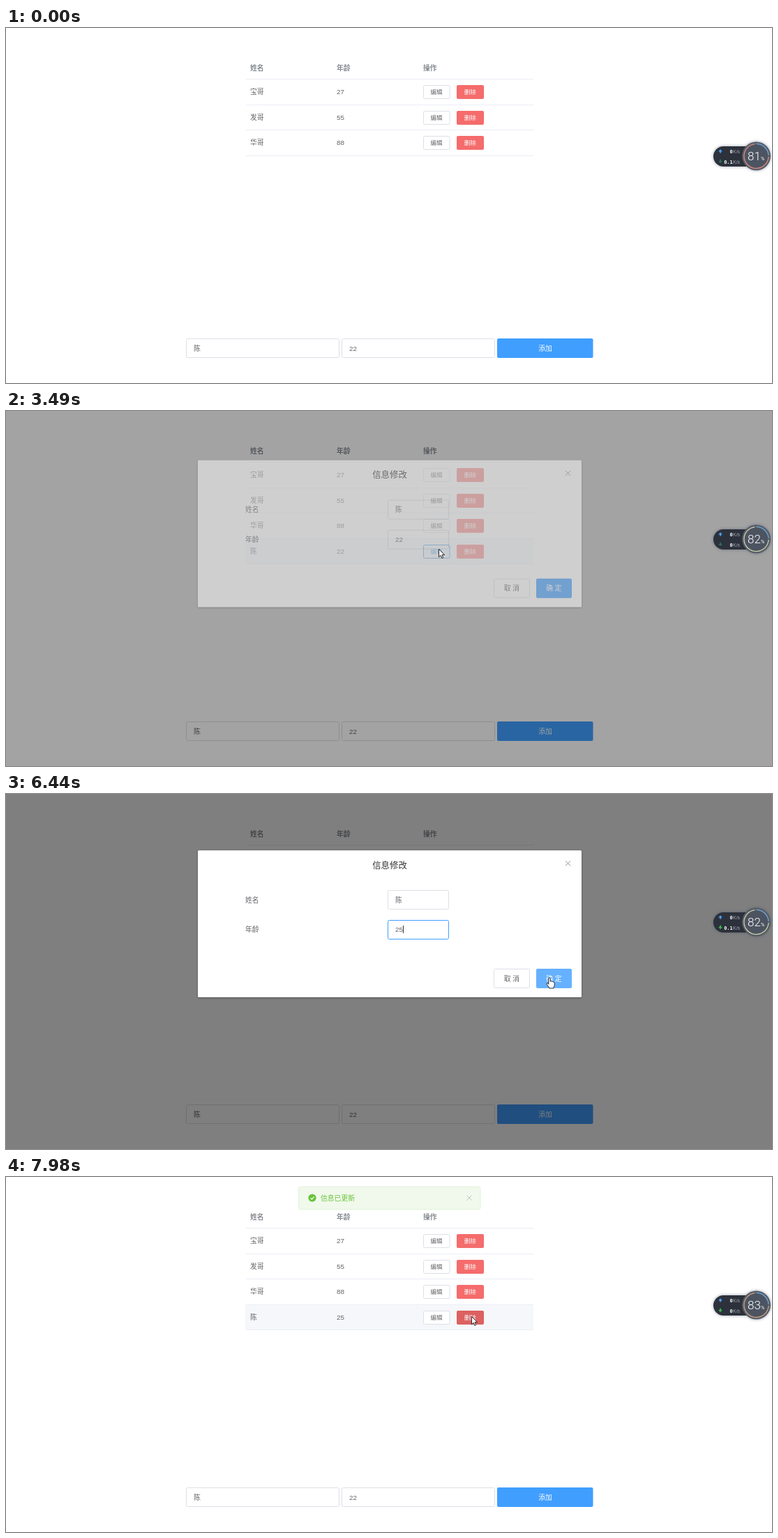
Animation, 1098 px wide and 510 px high, one loop 8 s. Source, as an HTML page:

```html
<!DOCTYPE html>
<html lang="zh">
<head>
<meta charset="utf-8">
<title>信息修改</title>
<style>
html, body { margin: 0; width: 100%; height: 100%; overflow: hidden; background: #fff; }
svg { display: block; width: 1098px; height: 510px; }
text { font: 9.8px "Liberation Sans", "Noto Sans CJK SC", "Noto Sans CJK", sans-serif; fill: #606266; white-space: pre; }
.mid { text-anchor: middle; }
.end { text-anchor: end; }
.head { font-weight: 700; fill: #858a90; }
.small { font-size: 8.5px; }
.title { font-size: 12.4px; fill: #303133; }
.white { fill: #fff; }
.green { fill: #67c23a; }
.line { fill: #ebeef5; }
.box { fill: #fff; stroke: #dcdfe6; }
.blue { fill: #409eff; }
.red { fill: #f56c6c; }
.cross { fill: none; stroke: #909399; }
.speed { font: 700 6.8px "DejaVu Sans Mono", monospace; fill: #fff; }
.unit { font-size: 7px; fill: #a3a9b3; }
.load { font: 300 17px Roboto, sans-serif; fill: #fff; }
.pct { font: 7px Roboto, sans-serif; fill: #fff; }
.pointer { fill: #fff; stroke: #26282c; stroke-linejoin: round; }
#panel { filter: drop-shadow(0 1px 1.5px rgba(0, 0, 0, .35)); }
#meter { filter: drop-shadow(0 0 2px rgba(60, 70, 95, .55)); }
</style>
</head>
<body>
<svg id="stage" viewBox="0 0 1098 510"></svg>
<script>
const LOOP = 8000;

// markup helpers
const label = (s, x, cy, cls = '', id = '', size = 9.8) =>
  `<text id="${id}" class="${cls}" x="${x}" y="${cy + size * .37}">${s}</text>`;
const rect = (x, y, w, h, cls, id = '', r = 2) =>
  `<rect id="${id}" class="${cls}" x="${x}" y="${y}" width="${w}" height="${h}" rx="${r}"/>`;
const field = (x, y, w, h, id) => rect(x + .5, y + .5, w - 1, h - 1, 'box', id);
const cross = (x, y, color = '#909399') =>
  `<path class="cross" style="stroke:${color}" d="M${x - 3.5} ${y - 3.5}l7 7m0-7l-7 7"/>`;

function row(i, name, age) {
  const top = Math.round(73 + 36.5 * i), y = Math.round(82 + 36.5 * i), cy = y + 9.7;
  return `<g id="row${i}">` +
    rect(343, top + 1, 413, 36, '', 'bg' + i, 0).replace('<rect', '<rect fill="none"') +
    rect(344, Math.round(109.5 + 36.5 * i), 412, 1, 'line', '', 0) +
    label(name, 350, cy) + label(age, 474, cy, '', 'age' + i) +
    field(598, y, 38.5, 20, 'edit' + i) + label('编辑', 617, cy + .3, 'mid small', 'editText' + i, 8.5) +
    rect(646, y, 39, 20, 'red', 'del' + i) + label('删除', 665.3, cy + .3, 'mid small white', '', 8.5) + '</g>';
}

const page = label('姓名', 350, 57, 'head') + label('年龄', 474, 57, 'head') + label('操作', 598, 57, 'head') +
  rect(344, 73, 412, 1, 'line', '', 0) +
  row(0, '宝哥', 27) + row(1, '发哥', 55) + row(2, '华哥', 88) + row(3, '陈', 22) +
  field(258, 446, 220, 28) + label('陈', 269, 460) +
  field(481, 446, 220, 28) + label('22', 492, 460) +
  rect(704, 446, 137.5, 28, 'blue', 'add') + label('添加', 773, 460, 'mid white');

const dialog = rect(275, 81, 550, 211, 'white', 'panel', 1.5) +
  label('信息修改', 550, 102, 'mid title', '', 12.4) + cross(805.5, 99.7) +
  label('姓名', 343, 152) + field(547, 138, 88, 28) + label('陈', 558, 152) +
  label('年龄', 343, 194.5) + field(547, 181, 88, 28, 'ageBox') +
  label('22', 558, 194.7, '', 'ageText') +
  '<rect id="sel" y="189" height="12" fill="#3390ff"/>' +
  label('22', 558, 194.7, 'white', 'selText') +
  '<rect id="caret" y="189" width="1" height="11" fill="#333"/>' +
  field(699, 251, 52, 28) + label('取 消', 725, 265, 'mid') +
  rect(760, 251, 51, 28, 'blue', 'ok') + label('确 定', 785.5, 265, 'mid white');

const notice = rect(419.5, 14, 260.5, 32.5, '', '', 2.5).replace('<rect', '<rect fill="#f0f9eb" stroke="#e1f3d8"') +
  '<circle cx="439" cy="30" r="5.6" fill="#67c23a"/>' +
  '<path d="M436.4 30.2l1.9 1.9 3.4-3.8" fill="none" stroke="#fff" stroke-width="1.2"/>' +
  label('信息已更新', 451, 30.3, 'green') + cross(664, 30, '#c0c4cc');

const meter = '<g id="meter"><rect x="1014" y="170" width="62" height="29" rx="14.5" fill="#2c313b"/>' +
  '<circle cx="1075.5" cy="184" r="20.5" fill="#575d68"/></g>' +
  '<circle cx="1075.5" cy="184" r="17" fill="#4d5461"/>' +
  '<g fill="none" stroke-width="1.3" transform="rotate(-90 1075.5 184)">' +
  '<circle id="ring" cx="1075.5" cy="184" r="17.6" pathLength="100" stroke-dasharray="0 26 72 2"/>' +
  '<circle cx="1075.5" cy="184" r="17.6" pathLength="100" stroke="#6fa9d8" stroke-dasharray="24 76"/></g>' +
  '<path d="M1024 174.2l3 3.2h-2v2.2h-2v-2.2h-2z" fill="#4a9df0"/>' +
  '<path id="downIcon" d="M1024 194.2l3-3.2h-2v-2.2h-2v2.2h-2z"/>' +
  label('0', 1041.5, 177.6, 'end speed', 'up', 6.8) + label('K/s', 1042, 177.6, 'unit', '', 7) +
  label('0', 1041.5, 192, 'end speed', 'down', 6.8) + label('K/s', 1042, 192, 'unit', '', 7) +
  label('81', 1063, 183.8, 'load', 'load', 17) + label('%', 1082, 187, 'pct', '', 7);

const bubble = '<g id="bubble"><path d="M535 188.5l-2.4 4.8 6-2.6z" fill="#eceef2" stroke="#7b7f8c" stroke-width=".8"/>' +
  '<ellipse cx="540.7" cy="185" rx="8" ry="5.8" fill="#eceef2" stroke="#7b7f8c" stroke-width=".8"/>' +
  '<circle cx="540.7" cy="184.8" r="4.2" fill="#3b3748"/></g>';

const pointers = '<g id="pointer">' +
  '<path id="arrow" class="pointer" d="M.5.5V11.8L3.1 9.4 4.9 13.4 6.7 12.6 5 8.7H8.6Z"/>' +
  '<path id="hand" class="pointer" d="M-1.2 8V1a1.2 1.2 0 0 1 2.4 0V5.2q1.6-.9 2.2.4 1.5-.6 2 .5 1.8-.4 1.8 1.3V10.5q0 1.8-1.2 3V15H-.6V13.8L-3.9 9.4q-.6-1.4.6-1.7 1-.2 2.1 1.6Z"/>' +
  '<path id="beam" d="M-2.5-5.5H2.5M0-5.5V5.5M-2.5 5.5H2.5" fill="none" stroke="#222"/></g>';

const stage = document.getElementById('stage');
stage.innerHTML = (page + '<rect id="mask" width="1098" height="510"/>' +
  `<g id="dialog">${dialog}</g>` + bubble + `<g id="notice">${notice}</g>` + meter + pointers)
  .replace(/ (id|class)=""/g, '');

const el = {};
stage.querySelectorAll('[id]').forEach(n => el[n.id] = n);
const show = (id, on) => el[id].style.display = on ? '' : 'none';
const paint = (id, fill, stroke) => { el[id].style.fill = fill; if (stroke) el[id].style.stroke = stroke; };

// stepped values: [time, value], the last one reached holds
const steps = {
  load: [[0, 81], [430, 82], [1480, 83], [2620, 82], [4810, 83], [5900, 82], [6680, 83]],
  up: [[0, '0'], [430, '0.1'], [1480, '0']],
  down: [[0, '0.1'], [430, '0'], [2320, '0.1'], [2620, '0'], [5900, '0.1'], [7200, '0']],
  downIcon: [[0, '#2f6b52'], [3640, '#35b34a']],
  ring: [[0, '#d98a7c'], [3490, '#c8cfa6'], [6680, '#c9a084']],
  add: [[0, '#409eff'], [1060, '#66b1ff'], [1480, '#3a8ee6'], [1780, '#66b1ff'], [2690, '#409eff']],
  edit: [[0, 0], [3050, 1], [3410, 2], [3640, 0]],
  del: [[0, '#f56c6c'], [7560, '#f78989'], [7980, '#dd6161']],
  hover: [[0, 'none'], [3020, '#f5f7fa'], [3800, 'none'], [7480, '#f5f7fa']],
  ok: [[0, '#409eff'], [6280, '#66b1ff'], [6510, '#3a8ee6'], [6590, '#66b1ff']],
  ageBox: [[0, '#dcdfe6'], [4190, '#409eff'], [6510, '#dcdfe6']],
  ageText: [[0, '22'], [5070, '2'], [5300, '25']],
  pointer: [[0, ''], [620, 'arrow'], [1060, 'hand'], [1480, 'arrow'], [1780, 'hand'], [2690, 'arrow'],
    [3050, 'hand'], [3410, 'arrow'], [3760, 'beam'], [4520, 'arrow'], [6280, 'hand'], [6510, 'arrow'],
    [6590, 'hand'], [6890, 'arrow'], [7560, 'hand'], [7980, 'arrow']]
};
const editLook = [['#fff', '#dcdfe6', '#606266'], ['#ecf5ff', '#c6e2ff', '#409eff'], ['#ecf5ff', '#3a8ee6', '#3a8ee6']];

// pointer route: time, x, y
const route = [[620, 993, 490], [900, 890, 440], [1310, 767, 461], [2560, 767, 461], [2860, 690, 310],
  [3110, 620, 198], [3640, 620, 198], [4050, 576, 194], [4190, 576, 194], [4580, 538, 195], [5700, 538, 195],
  [6150, 776, 278], [6420, 779, 264], [7060, 779, 264], [7680, 667, 200]];

const now = (name, t) => steps[name].filter(s => s[0] <= t).pop()[1];
const clamp = x => Math.max(0, Math.min(1, x));

// the CSS "ease" curve
function ease(x) {
  x = clamp(x);
  let a = 0, b = 1;
  for (let i = 0; i < 20; i++) {
    const m = (a + b) / 2, n = 1 - m;
    if (.75 * n * n * m + .75 * n * m * m + m * m * m < x) a = m; else b = m;
  }
  const n = 1 - a;
  return .3 * n * n * a + 3 * n * a * a + a * a * a;
}

function place(t) {
  const i = route.findIndex(p => p[0] > t);
  if (i === 0) return route[0].slice(1);
  if (i < 0) return route[route.length - 1].slice(1);
  const p = route[i - 1], q = route[i], k = (t - p[0]) / (q[0] - p[0]);
  return [p[1] + (q[1] - p[1]) * k, p[2] + (q[2] - p[2]) * k];
}

function fade(t, start, end, length) {
  if (t < 3490) return 0;
  return t < 6590 ? ease((t - start) / length) : 1 - ease((t - end) / length);
}

function render(t) {
  for (const id of ['load', 'up', 'down', 'ageText']) {
    const s = String(now(id, t));
    if (el[id].textContent !== s) el[id].textContent = s;
  }
  paint('downIcon', now('downIcon', t));
  el.ring.style.stroke = now('ring', t);
  paint('add', now('add', t));
  paint('ok', now('ok', t));
  paint('del3', now('del', t));
  paint('bg3', now('hover', t));
  paint('ageBox', '#fff', now('ageBox', t));
  const [bg, edge, ink] = editLook[now('edit', t)];
  paint('edit3', bg, edge);
  paint('editText3', ink);
  show('row3', t >= 2320);
  el.age3.textContent = t < 6680 ? 22 : 25;

  const p = fade(t, 3405, 6550, 300);
  el.mask.style.opacity = fade(t, 3405, 6540, 200) / 2;
  el.dialog.style.opacity = p;
  el.dialog.setAttribute('transform', `translate(0 ${-20 * (1 - p)})`);
  show('dialog', p > 0);

  const [x, y] = place(t);
  const left = Math.max(558, Math.min(569, x)), picked = t >= 4190 && t < 5070;
  show('sel', picked);
  show('selText', picked && left < 560);
  el.sel.setAttribute('x', left);
  el.sel.setAttribute('width', 569 - left);
  show('caret', t >= 5070 && t < 6510 && !(t >= 5800 && t < 6300));
  el.caret.setAttribute('x', t < 5300 ? 563.5 : 569);
  show('bubble', t >= 4580 && t < 5830);

  show('notice', t >= 6590);
  el.notice.style.opacity = ease((t - 6555) / 300);
  el.notice.setAttribute('transform', `translate(0 ${-33 * (1 - ease((t - 6555) / 400))})`);

  const kind = now('pointer', t);
  for (const id of ['arrow', 'hand', 'beam']) show(id, id === kind);
  el.pointer.setAttribute('transform', `translate(${x} ${y})`);
}

const begin = performance.now();
function tick() {
  render((performance.now() - begin) % LOOP);
  requestAnimationFrame(tick);
}
tick();
</script>
</body>
</html>
```
